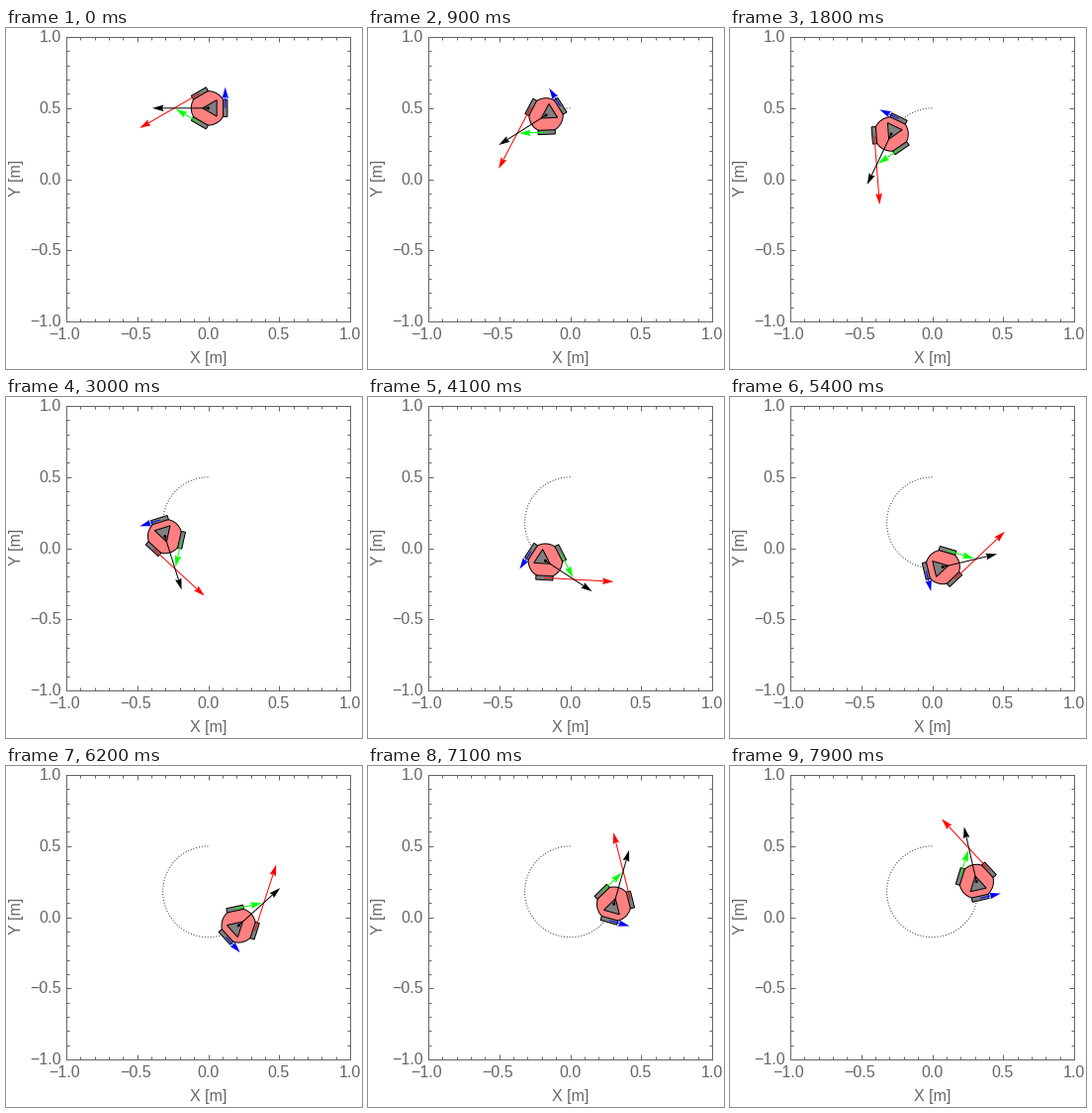
Animation of 360x344 px, one loop 8000 ms. Source, as a matplotlib script:

```python
import numpy as np
import matplotlib.pyplot as plt
from matplotlib.animation import FuncAnimation
from matplotlib.patches import Circle, Polygon

W, H, DPI = 360, 344, 100
PX = 72 / DPI                      # one pixel in points
FRAMES, STEP = 80, 0.1             # seconds per frame
CX, CY, SCALE = 204.5, 152.6, 143.5    # plot origin and pixels per metre
LEFT, RIGHT, TOP, BOTTOM = 61, 348, 9, 296
GRAY = "#666666"

SPEED, OMEGA = 0.2, 0.625          # m/s, rad/s
BODY_R = 0.12
ORBIT_R = SPEED / OMEGA
ORBIT_Y = 0.5 - ORBIT_R
ARROW_GAIN = 1.97

plt.rcParams["font.family"] = "Liberation Sans"
fig = plt.figure(figsize=(W / DPI, H / DPI), dpi=DPI, facecolor="white")
ax = fig.add_axes([0, 0, 1, 1])
ax.set_xlim(0, W)
ax.set_ylim(H, 0)
ax.axis("off")


def to_px(points):
    p = np.asarray(points, float)
    return np.column_stack((CX + SCALE * p[:, 0], CY - SCALE * p[:, 1]))


def direction(a):
    return np.array([np.cos(a), np.sin(a)])


def rotate(points, a):
    c, s = np.cos(a), np.sin(a)
    return np.asarray(points) @ np.array([[c, s], [-s, c]])


def orbit(t):
    a = np.pi / 2 + OMEGA * np.asarray(t)
    return np.stack((ORBIT_R * np.cos(a), ORBIT_Y + ORBIT_R * np.sin(a)), axis=-1)


def line(x, y):
    ax.plot(x, y, color=GRAY, lw=PX, solid_capstyle="butt", zorder=1)


def label(x, y, s, ha="center", **kw):
    ax.text(x, y, s, ha=ha, va="baseline", size=16 * PX, color=GRAY, **kw)


def draw_frame():
    line([LEFT, RIGHT, RIGHT, LEFT, LEFT], [TOP, TOP, BOTTOM, BOTTOM, TOP])
    for k in range(-10, 11):
        size = 5 if k % 5 == 0 else 3
        x = LEFT + (k + 10) * (RIGHT - LEFT) / 20
        y = BOTTOM - (k + 10) * (BOTTOM - TOP) / 20
        line([x, x], [BOTTOM, BOTTOM - size])
        line([x, x], [TOP, TOP + size])
        line([LEFT, LEFT + size], [y, y])
        line([RIGHT, RIGHT - size], [y, y])
        if k % 5 == 0:
            s = f"{k / 10:.1f}".replace("-", "\u2212")
            label(x - (1.5 if k < 0 else 0.5), 314, s)
            label(56, y + 5, s, ha="right")
    label(204.5, 338, "X [m]")
    label(14.5, 151, "Y [m]", rotation=90, rotation_mode="anchor")


class Arrow:
    def __init__(self, color):
        self.shaft, = ax.plot([], [], color=color, lw=PX, zorder=6,
                              solid_capstyle="butt", snap=False)
        self.head = Polygon(np.zeros((4, 2)), fc=color, ec="none", zorder=7)
        ax.add_patch(self.head)

    def place(self, start, vec):
        a, b = to_px([start, start + vec])
        u = (b - a) / np.hypot(*(b - a))
        n = np.array([-u[1], u[0]])
        back = b - 10 * u
        self.shaft.set_data(*zip(a, back))
        self.head.set_xy([b, b - 11.5 * u + 3.3 * n, back,
                          b - 11.5 * u - 3.3 * n])


def shape(color, zorder):
    p = Polygon(np.zeros((3, 2)), fc=color, ec="black", lw=PX,
                joinstyle="miter", zorder=zorder, snap=False)
    return ax.add_patch(p)


draw_frame()
trail, = ax.plot([], [], color="#333333", lw=PX, ls=(0, (1, 1.87)),
                 dash_capstyle="butt", snap=False, zorder=2)
body = ax.add_patch(Circle((0, 0), BODY_R * SCALE, fc="#ff8080", ec="black",
                           lw=PX, zorder=3))
wheels = [shape("#808080", 4) for _ in range(3)]
nose = shape("#808080", 4)
hub = ax.add_patch(Circle((0, 0), 1.5, fc="black", ec="none", zorder=8))
wheel_arrows = [Arrow(c) for c in ("blue", "red", "lime")]
body_arrow = Arrow("black")

WHEEL = np.array([(-0.015, -0.06), (0.015, -0.06), (0.015, 0.06), (-0.015, 0.06)])
NOSE = np.array([(-0.04, 0), (0.06, 0.057), (0.06, -0.057)])


def update(i):
    turn = OMEGA * STEP * i
    pos = orbit(STEP * i)
    vel = SPEED * direction(turn + np.pi)
    trail.set_data(*to_px(orbit(STEP * np.arange(i + 1))).T)
    center = to_px([pos])[0]
    body.center = hub.center = tuple(center)
    nose.set_xy(to_px(pos + rotate(NOSE, turn)))
    for k, (wheel, arrow) in enumerate(zip(wheels, wheel_arrows)):
        a = turn + k * 2 * np.pi / 3
        mount = pos + BODY_R * direction(a)
        tangent = direction(a + np.pi / 2)
        rim = vel @ tangent + OMEGA * BODY_R
        wheel.set_xy(to_px(mount + rotate(WHEEL, a)))
        arrow.place(mount, ARROW_GAIN * rim * tangent)
    body_arrow.place(pos, ARROW_GAIN * vel)
    return []


anim = FuncAnimation(fig, update, frames=FRAMES, interval=1000 * STEP,
                     repeat=True, repeat_delay=0, blit=False)
plt.show()
```
